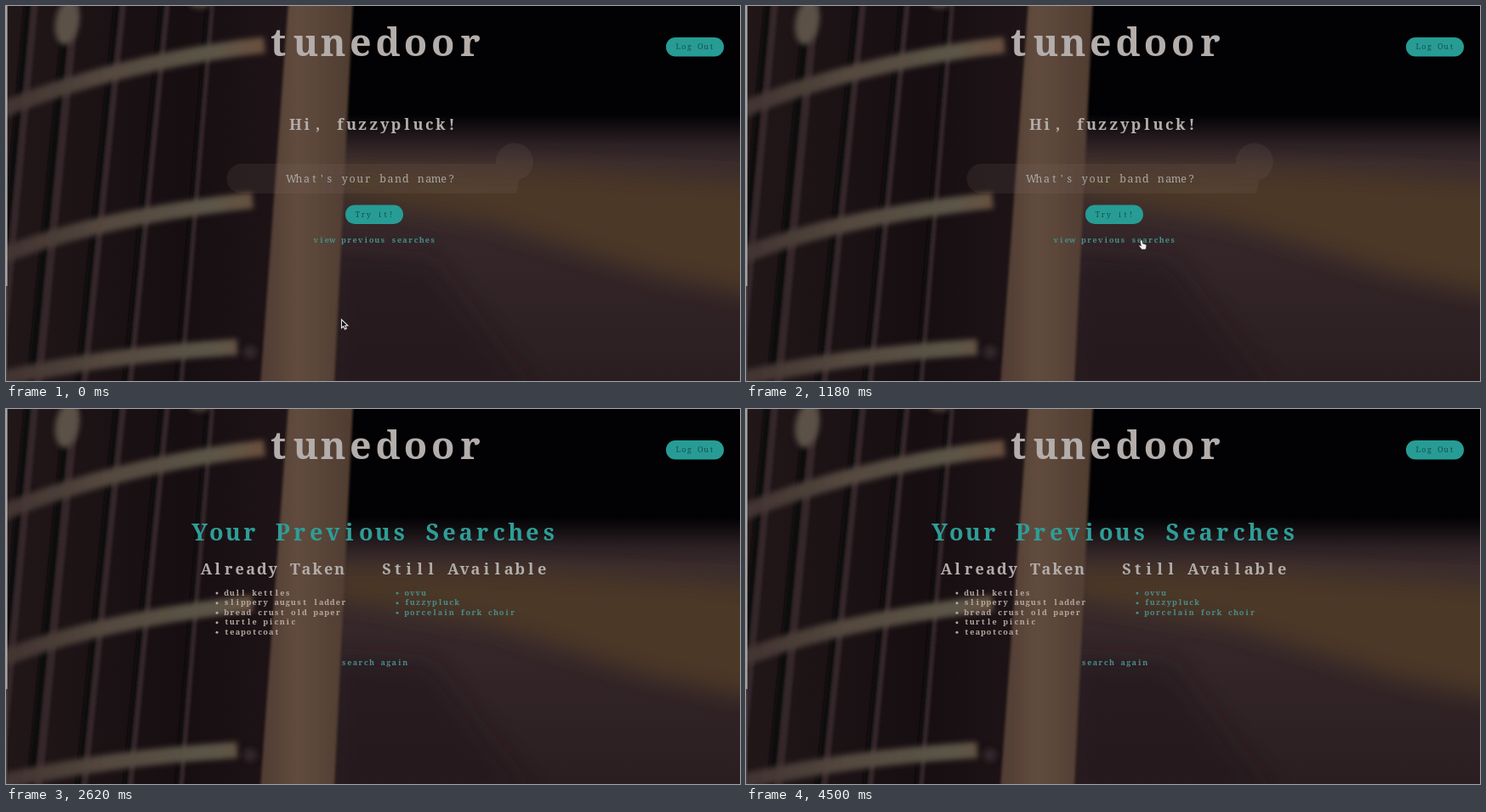
Write an HTML page that moves like this. It is 863 px wide and 442 px high and loops after 4520 ms.

```html
<!DOCTYPE html>
<html lang="en">
<head>
<meta charset="utf-8">
<title>Name search</title>
<style>
  html, body { margin: 0; width: 100%; height: 100%; overflow: hidden; background: #000; }
  svg { display: block; width: 863px; height: 442px; }
  text { font-family: "Noto Serif", "Liberation Serif", serif; font-weight: 600; text-anchor: middle; fill: #b3adab; }
  .teal { fill: #2f9d97; }
  .link { fill: #478f89; }
  .on-button { fill: #17524f; font-weight: 500; }
  .hint { fill: #a9a8a5; font-weight: 500; }
  .pale { fill: #b5a9a1; }
  .home, .history, .caret, .arrow, .hand { animation: 4520ms step-end infinite; }
  .home { animation-name: home; }
  .history { animation-name: history; }
  .caret { animation-name: caret; }
  .arrow { animation-name: arrow; }
  .hand { animation-name: hand; }
  .pointer { animation: move 4520ms infinite; }
  @keyframes home { 0% { visibility: visible } 33.2%, 100% { visibility: hidden } }
  @keyframes history { 0% { visibility: hidden } 33.2%, 100% { visibility: visible } }
  @keyframes caret { 0% { opacity: 0 } 11.1% { opacity: 1 } 22.1%, 100% { opacity: 0 } }
  @keyframes arrow { 0% { opacity: 1 } 16%, 100% { opacity: 0 } }
  @keyframes hand { 0% { opacity: 0 } 16%, 100% { opacity: 1 } }
  @keyframes move {
    0% { transform: translate(394px, 369px); animation-timing-function: ease-in-out }
    13.27% { transform: translate(457px, 294px); animation-timing-function: ease-out }
    18%, 100% { transform: translate(464px, 276px) }
  }
</style>
</head>
<body>
<svg viewBox="0 0 863 442">
  <defs>
    <filter id="soft" x="-20%" y="-20%" width="140%" height="140%"><feGaussianBlur stdDeviation="3"/></filter>
    <filter id="haze" x="-20%" y="-40%" width="140%" height="180%"><feGaussianBlur stdDeviation="14"/></filter>
    <filter id="thin" filterUnits="userSpaceOnUse" x="-20" y="-20" width="903" height="482"><feGaussianBlur stdDeviation="1.6"/></filter>
    <linearGradient id="body" x2="0" y2="1">
      <stop offset=".29" stop-color="#020204"/>
      <stop offset=".37" stop-color="#2d2125"/>
      <stop offset=".42" stop-color="#392b2d"/>
      <stop offset=".6" stop-color="#35272a"/>
      <stop offset="1" stop-color="#2b1e20"/>
    </linearGradient>
    <linearGradient id="edge" gradientUnits="userSpaceOnUse" x1="305" x2="400">
      <stop offset="0" stop-color="#523e34"/>
      <stop offset=".4" stop-color="#614b3d"/>
      <stop offset="1" stop-color="#513e33"/>
    </linearGradient>
    <linearGradient id="wire" gradientUnits="userSpaceOnUse" x1="0" x2="305">
      <stop offset="0" stop-color="#413331"/>
      <stop offset=".4" stop-color="#55493f"/>
      <stop offset=".8" stop-color="#5c5547"/>
      <stop offset="1" stop-color="#6a4f3d"/>
    </linearGradient>
    <linearGradient id="board" x2="1" y2="0">
      <stop offset="0" stop-color="#211719"/>
      <stop offset=".6" stop-color="#170e11"/>
      <stop offset="1" stop-color="#1f1518"/>
    </linearGradient>
  </defs>

  <rect x="380" width="483" height="442" fill="url(#body)"/>
  <path d="M380 187 L600 190 L900 208 V345 L760 315 L570 255 L380 222Z" fill="#4b3726" filter="url(#haze)"/>
  <path d="M380 290 L500 300 L620 460 H380Z" fill="#21161a" opacity=".6" filter="url(#haze)"/>
  <rect width="345" height="442" fill="url(#board)"/>
  <g id="strings" filter="url(#thin)"></g>
  <g fill="none" stroke="url(#wire)" stroke-width="19" filter="url(#soft)">
    <path d="M-8 124 C70 90 190 58 304 46"/>
    <path d="M-8 296 C70 263 180 241 290 229"/>
    <path d="M-8 440 C80 420 180 407 272 402"/>
  </g>
  <g filter="url(#soft)">
    <ellipse cx="72" cy="19" rx="14" ry="27" fill="#5b5146" transform="rotate(9 72 19)"/>
    <ellipse cx="228" cy="-3" rx="12" ry="6" fill="#4c4039"/>
    <circle cx="287" cy="408" r="8" fill="#33282a"/>
  </g>
  <path d="M332 -5 H408 L386 447 H299Z" fill="url(#edge)" filter="url(#thin)"/>
  <rect width="1.6" height="330" fill="#aaa6a4"/>
  <rect y="330" width="1.6" height="112" fill="#48403f"/>

  <text data-at="304 59 32.25">tunedoor</text>
  <rect x="776" y="37" width="68" height="22.5" rx="11" fill="#279c95"/>
  <text class="on-button" data-at="787 51 6.55">Log Out</text>

  <g class="home">
    <text data-at="334 146 13.1">Hi, fuzzypluck!</text>
    <path d="M277 186 H576 A22 22 0 1 1 603 205 L600 221 H277 A17.5 17.5 0 0 1 277 186Z" fill="#8a7068" opacity=".14"/>
    <text class="hint" data-at="331 208 8.96">What's your band name?</text>
    <rect class="caret" x="429.5" y="195" width="1.2" height="17" fill="#b9b4b1"/>
    <rect x="399" y="234.5" width="68" height="22.5" rx="11" fill="#279c95"/>
    <text class="on-button" data-at="410 249 6.55">Try it!</text>
    <text class="link" data-at="361 279 6.55">view previous searches</text>
    <g class="pointer">
      <path class="arrow" d="M.5 .5 V10.5 L2.8 8.5 L4.4 12 L6.3 11.2 L4.8 7.8 H8Z" fill="#111" stroke="#e6e6e6" stroke-width="1.1"/>
      <path class="hand" d="M0 0 Q1.5 -1 2 1 L2.6 4 L6 5 Q7.2 5.5 6.8 7.5 L6 11 H1.4 L-2 7 Q-2.5 5.6 -.8 6 L.4 7 L-.6 1Z" fill="#f2f2f2" stroke="#222" stroke-width=".6"/>
    </g>
  </g>

  <g class="history">
    <text class="teal" data-at="218 155 19.55">Your Previous Searches</text>
    <text data-at="229 195 13.05">Already Taken</text>
    <text data-at="441 195 13.05">Still Available</text>
    <g id="taken" class="pale"></g>
    <g id="free" class="link"></g>
    <text class="link" data-at="394 302 6.55">search again</text>
  </g>
</svg>
<script>
  const NS = "http://www.w3.org/2000/svg";

  function add(parent, tag, attrs, text = "") {
    const el = document.createElementNS(NS, tag);
    for (const key in attrs) el.setAttribute(key, attrs[key]);
    el.textContent = text;
    parent.append(el);
    return el;
  }

  function list(id, x, names) {
    const box = document.getElementById(id);
    names.forEach((name, i) => {
      const y = 219.7 + i * 11.55;
      add(box, "circle", { cx: x - 8, cy: y - 2.6, r: 1.5 });
      add(box, "text", { class: box.getAttribute("class"), "data-at": `${x} ${y} 6.55` }, name);
    });
  }

  list("taken", 256, ["dull kettles", "slippery august ladder", "bread crust old paper", "turtle picnic", "teapotcoat"]);
  list("free", 468, ["ovvu", "fuzzypluck", "porcelain fork choir"]);

  // Typewriter setting: every character is centred in a cell of equal width.
  for (const el of document.querySelectorAll("[data-at]")) {
    const [x, y, pitch] = el.dataset.at.split(" ").map(Number);
    const cells = [...el.textContent].map((_, i) => (x + (i + 0.5) * pitch).toFixed(2));
    el.setAttribute("x", cells.join(" "));
    el.setAttribute("y", y);
    el.setAttribute("font-size", pitch / 0.72);
  }

  // Strings: a dim bright line with a dark shadow beside it.
  const strings = document.getElementById("strings");
  for (const [top, bottom, width] of [[34, -8, 8], [82, 38, 9], [138, 92, 7], [190, 146, 6], [243, 206, 5]]) {
    const line = (dx, stroke, w) =>
      add(strings, "path", { d: `M${top + dx} -5 L${bottom + dx} 447`, stroke, "stroke-width": w });
    line(-width, "#0d0709", width);
    line(0, "#35282a", width);
  }
</script>
</body>
</html>
```
